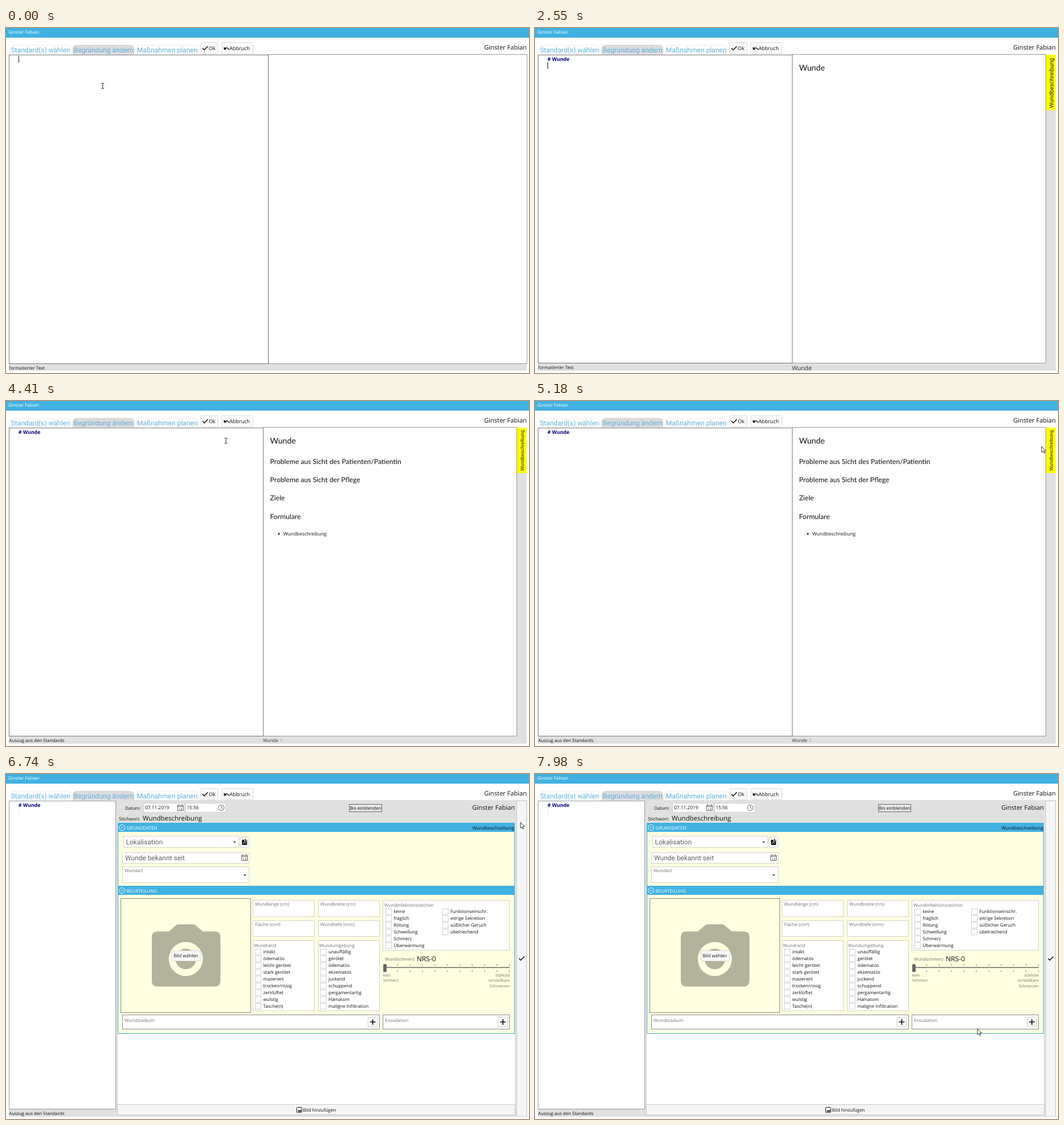
These frames come from a looping animation (922x608 px, 8000 ms). An HTML page:

```html
<!DOCTYPE html>
<html lang="de">
<head>
<meta charset="utf-8">
<title>Wundbeschreibung</title>
<style>
  html, body { margin: 0; width: 100%; height: 100%; overflow: hidden; background: #fff; }
  svg { display: block; width: 922px; height: 608px; }
  text { font-family: "Open Sans", "Noto Sans", sans-serif; white-space: pre; text-rendering: geometricPrecision; }
  .rob { font-family: Roboto, "Liberation Sans", sans-serif; }
  .lat { font-family: Lato, "Open Sans", sans-serif; }
  rect { shape-rendering: crispEdges; }
  .soft { shape-rendering: auto; }
</style>
</head>
<body>
<svg id="stage" viewBox="0 0 922 608"></svg>
<script>
const LOOP = 8000, STEP = 76.67;
const BLUE = '#41b1e1', GREY = '#e0e0e0', PALE = '#ffffe1', LABEL = '#707070';
const NAME = 'Ginster Fabian';

const attrs = o => Object.entries(o).map(([k, v]) => ` ${k}="${v}"`).join('');

function text(x, y, s, size = 8, fill = '#111', more = {}) {
  return `<text${attrs({ x, y, 'font-size': size, fill, ...more })}>${s}</text>`;
}

// Outer edges x0..x1, y0..y1; a stroke lies one pixel wide inside them.
function box(x0, y0, x1, y1, fill, stroke, more = {}) {
  const h = stroke ? 0.5 : 0, d = stroke ? 1 : 0;
  return `<rect${attrs({ x: x0 + h, y: y0 + h, width: x1 - x0 - d, height: y1 - y0 - d,
    fill, stroke: stroke || 'none', ...more })}/>`;
}

function path(d, stroke = '#111', width = 1, fill = 'none') {
  return `<path${attrs({ d, stroke, 'stroke-width': width, fill })}/>`;
}

const group = (id, ...parts) => `<g id="${id}">${parts.join('')}</g>`;
const round = r => ({ rx: r, class: 'soft' });
const END = { 'text-anchor': 'end' }, MID = { 'text-anchor': 'middle' };
const ROB = { class: 'rob' }, LAT = { class: 'lat' };

function topTab(x, w, label, active) {
  const d = `M${x} 46.5V37Q${x} 30.5 ${x + 7} 30.5H${x + w - 7}Q${x + w} 30.5 ${x + w} 37V46.5`;
  return path(d, active ? '#cfcfcf' : '#ececec', 1, active ? '#dcdcdc' : '#fff')
    + text(x + 1.2, 43, label, 12.1, '#5fb0de', ROB);
}

const calendar = (x, y) => box(x, y + 1, x + 11, y + 11, '#fff', '#666')
  + path(`M${x} ${y + 3.5}h11M${x + 2.5} ${y - 1}v3M${x + 8.5} ${y - 1}v3`, '#666')
  + text(x + 5.5, y + 9.6, '14', 6, '#444', MID);

const plus = (x, y) => box(x - 9, y - 9, x + 9, y + 9, '#fafafa', '#ccc', round(2))
  + path(`M${x - 5} ${y}h10M${x} ${y - 5}v10`, '#111', 1.7);

const check = (x, y) => path(`M${x - 4.5} ${y}l3 3.2l6.2 -6.4`, '#111', 1.6);

const arrowDown = (x, y) => path(`M${x - 2.2} ${y - 1}h4.4l-2.2 2.4z`, 'none', 0, '#111');

const field = (x0, y0, x1, y1, label) =>
  box(x0, y0, x1, y1, '#fff', '#d4d4c4') + text(x0 + 4, y0 + 9.5, label, 8, LABEL);

function checks(x, y, items) {
  return items.map((s, i) => {
    const cy = Math.round(y + i * 12.05);
    return box(x, cy - 5, x + 11, cy + 6, '#fff', '#d0d0d0') + text(x + 14.5, cy + 2.8, s);
  }).join('');
}

function section(y, title) {
  return box(197, y, 897, y + 16, BLUE)
    + `<circle cx="204.5" cy="${y + 8.5}" r="5" fill="none" stroke="#fff"/>`
    + path(`M202 ${y + 9.7}l2.5 -2.5l2.5 2.5`, '#fff')
    + text(212.5, y + 12, title, 8.1, '#fff');
}

const frame = [
  box(0, 0, 922, 17, BLUE),
  text(4, 10, NAME, 8.05, '#fff'),
  topTab(7.5, 107, 'Standard(s) wählen'),
  topTab(118, 107.5, 'Begründung ändern', true),
  topTab(229.5, 109, 'Maßnahmen planen'),
  box(343, 25, 374, 46, '#fafafa', '#dadada', round(2)), check(351, 35.5),
  text(357.5, 38.6, 'Ok', 9),
  box(380, 25, 436, 46, '#fafafa', '#dadada', round(2)),
  path('M384 33v5h5z', 'none', 0, '#111'), path('M385.5 36.3q4.5 -3.300 7.800 1.700', '#111', 1.4),
  text(394, 38.6, 'Abbruch', 9),
  text(918, 38, NAME, 11.1, '#111', END)
];

const empty = group('empty',
  box(5, 592, 918, 604, GREY),
  box(5, 47, 463, 592, '#fff', '#777'),
  box(462, 46, 919, 592, 'none', '#999'),
  box(462, 47, 463, 592, '#666'));

const preview = group('preview',
  box(5, 591, 918, 604, GREY),
  box(5, 47, 454, 591, '#fff', '#777'),
  box(453, 46, 901, 591, '#fff', '#999'),
  box(453, 47, 454, 591, '#777'),
  box(901, 47, 918, 604, GREY),
  text(465.5, 74.5, 'Wunde', 14.2, '#111', LAT),
  group('plan',
    ['Probleme aus Sicht des Patienten/Patientin', 'Probleme aus Sicht der Pflege', 'Ziele', 'Formulare']
      .map((s, i) => text(465.5, 110.5 + i * 32.4, s, 12.2, '#111', LAT)).join(''),
    '<circle cx="481" cy="234" r="1.5"/>',
    text(489, 237, 'Wundbeschreibung', 8.4)),
  text(483, 600.5, 'X', 8.4, '#6db6e0'),
  text(453, 600.5, 'Wunde', 8.1, '#333', { id: 'crumb' }),
  '<rect id="tabBox" x="901" y="47" width="17" height="80"/>',
  text(0, 0, 'Wundbeschreibung', 8.4, '#222', { id: 'tabText', class: 'rob' }),
  '<rect id="tabRing" x="901" y="47.5" width="16.5" height="79.5" rx="2" class="soft" fill="none" stroke="#111" stroke-width="1.8"/>');

const ticks = Array.from({ length: 11 }, (_, i) => `M${668.5 + i * 21.9} 335v3m0 8v3`).join('');

const form = group('form',
  box(5, 591, 194, 604, GREY),
  box(5, 47, 194, 591, '#fff', '#999'),
  box(194, 46, 919, 604, GREY),
  box(900, 47, 918, 604, '#f6f6f6', '#d0d0d0', { id: 'strip' }), check(909, 325),

  text(210, 63, 'Datum:', 7.9),
  box(242, 51, 315, 68, '#fff', '#d0d0d0'), text(245, 62.3, '07.11.2019', 8.4), calendar(302, 54),
  box(316, 51, 388, 68, '#fff', '#d0d0d0'), text(318.5, 62.3, '15:56', 8.4),
  '<circle cx="379.5" cy="59.5" r="5" fill="#fff" stroke="#555"/>', path('M379.5 56v3.5l2.5 1.5', '#555'),
  box(605, 53, 663, 67, '#e8e8e8', '#666'), text(606.5, 63.2, 'Bis einblenden'),
  text(897, 63, NAME, 11.1, '#111', END),
  text(199, 81.5, 'Stichwort:', 8.1), text(241, 82, 'Wundbeschreibung', 11.5),

  box(197, 86, 897, 458, PALE, BLUE),
  section(86, 'GRUNDDATEN'), text(896, 98, 'Wundbeschreibung', 8.1, '#111', END),
  section(197, 'BEURTEILUNG'),

  box(207, 109, 411, 130, '#fff', '#d4d4c4'), text(211.5, 124, 'Lokalisation', 12, '#606060', ROB),
  arrowDown(403, 120),
  box(412, 110, 429, 130, '#fafafa', '#d4d4d4', round(2)),
  box(416, 116, 425, 125, '#111', null, round(1)), path('M420.5 114.5h3v4h-3z', '#fff', 1, '#111'),
  path('M417.5 123l2.5 -3l2 2l1.5 -1', '#fff'),
  box(205, 138, 429, 158, '#fff', '#d4d4c4'), text(210, 152, 'Wunde bekannt seit', 12, '#606060', ROB),
  calendar(415, 142),
  field(205, 163, 429, 192, 'Wundart'), arrowDown(421, 178),

  box(202, 219, 432, 421, PALE, '#8a8a7a'),
  path('M267 277.5H287L300 266.500Q302 265 304 265H330Q332 265 334 266.500L347 277.5H368Q378 277.5 378 287.5V364.500Q378 374.500 368 374.500H267Q257 374.500 257 364.500V287.5Q257 277.5 267 277.5Z', 'none', 0, '#b2b29d'),
  `<circle cx="317" cy="326" r="24" fill="none" stroke="${PALE}" stroke-width="12"/>`,
  box(292, 311, 343, 330, '#fafafa', '#d4d4d4', round(2)), text(317, 323, 'Bild wählen', 8, '#111', MID),

  field(435, 222, 544, 252, 'Wundlänge (cm)'), field(550, 222, 659, 252, 'Wundbreite (cm)'),
  field(435, 258, 544, 287, 'Fläche (cm²)'), field(550, 258, 659, 287, 'Wundtiefe (mm)'),
  box(435, 293, 544, 418, '#fff', '#d4d4c4'), text(437, 304.5, 'Wundrand', 8, LABEL),
  checks(439, 313, ['intakt', 'ödematös', 'leicht gerötet', 'stark gerötet', 'mazeriert',
    'trocken/rissig', 'zerklüftet', 'wulstig', 'Tasche(n)']),
  box(550, 293, 659, 418, '#fff', '#d4d4c4'), text(552, 304.5, 'Wundumgebung', 8, LABEL),
  checks(554, 313, ['unauffällig', 'gerötet', 'ödematös', 'ekzematös', 'juckend', 'schuppend',
    'pergamentartig', 'Hämatom', 'maligne Infiltration']),
  box(664, 222, 888, 311, '#fff', '#d4d4c4'), text(667, 234, 'Wundinfektionszeichen', 8, LABEL),
  checks(669, 242, ['keine', 'fraglich', 'Rötung', 'Schwellung', 'Schmerz', 'Überwärmung']),
  checks(769, 242, ['Funktionseinschr.', 'eitrige Sekretion', 'süßlicher Geruch', 'übelriechend']),

  text(668, 328.5, 'Wundschmerz', 7.8, LABEL), text(724, 330, 'NRS-0', 12.1),
  box(668, 340, 888, 342, '#8c8c80'), path(ticks, '#777'),
  box(665, 335, 671, 349, '#666', null, round(2)),
  text(665, 356.5, 'kein', 6.8, LABEL), text(665, 366.3, 'Schmerz', 6.8, LABEL),
  ['stärkste', 'vorstellbare', 'Schmerzen'].map((s, i) => text(888, 356.5 + i * 9.7, s, 6.8, LABEL, END)).join(''),

  box(205, 424, 659, 450, '#fff', '#8a8a8a'), text(209, 437, 'Wundstadium', 8, LABEL), plus(646.5, 437),
  box(664, 424, 888, 450, '#fff', '#8a8a8a'), text(668, 437, 'Exsudation', 8, LABEL), plus(876, 437),

  box(197, 458, 897, 583, '#fff'),
  box(197, 457, 897, 458, BLUE),
  box(196, 582, 898, 601, '#f5f5f5', '#c8c8c8'),
  box(512, 587, 522, 597, '#fff', '#111', round(1)), path('M514 595l2 -3l1.5 1.5l1.5 -2l2 3.5z', 'none', 0, '#111'),
  text(523.5, 595, 'Bild hinzufügen'));

const overlay = [
  text(5.5, 601.5, '', 7.95, '#111', { id: 'status' }),
  text(22, 58, '', 8.8, '#000080', { id: 'typed' }),
  box(22, 61, 23, 72, '#e8e8e8', null, { id: 'guide' }),
  box(0, 0, 1, 12, '#111', null, { id: 'caret' }),
  group('ibeam', path('M-2.5 -4.5h2l.5 .5l.5 -.5h2M-2.5 4.5h2l.5 -.5l.5 .5h2M0 -4v8', '#222')),
  group('arrow', path('M0 0V10.5L2.5 8.3L4.3 12L5.9 11.3L4.2 7.7H7.4Z', '#222', 0.9, '#fff'))
];

const stage = document.getElementById('stage');
stage.innerHTML = [...frame, empty, preview, form, ...overlay].join('');
const el = {};
stage.querySelectorAll('[id]').forEach(n => el[n.id] = n);

const show = (n, on) => n.style.display = on ? '' : 'none';
const set = (n, o) => { for (const k in o) n.setAttribute(k, o[k]); };

// Values between [time, a, b, ...] points, held at both ends.
function track(points, t) {
  const last = points[points.length - 1];
  if (t <= points[0][0]) return points[0].slice(1);
  for (let i = 1; i < points.length; i++) {
    const p = points[i - 1], q = points[i];
    if (t < q[0]) {
      const k = (t - p[0]) / (q[0] - p[0]);
      return p.slice(1).map((v, j) => v + (q[j + 1] - v) * k);
    }
  }
  return last.slice(1);
}

const stepped = (t, from) => from + Math.floor((t + 10 - from) / STEP) * STEP;

const KEYS = [160, 540, 860, 1010, 1240, 1550, 1930];
const TAB = [[2550, 98, 10.3], [3170, 88, 9.35], [3330, 80, 8.4]];
const CRUMB = [[2550, 10.5, 602.5], [3170, 8.85, 601], [3560, 8.1, 600.5]];
const TO_TAB = [[4110, 200, 99], [4417, 388, 70], [4640, 620, 62], [4877, 833, 68], [5180, 893, 80], [5480, 907, 85]];
const TO_FORM = [[7593, 907, 85], [7670, 872, 165], [7747, 810, 310], [7823, 762, 415], [7900, 768, 441], [7977, 780, 449]];

function mouse(t) {
  if (t < 80) return [170.5, 102];
  if (t < 4110) return null;
  if (t < 7670) return track(TO_TAB, stepped(t, 4110));
  return track(TO_FORM, stepped(t, 7670));
}

function caretOn(t) {
  if (t < 3030) return true;
  if (t < 3560 || t >= 5890) return false;
  return Math.floor((t - 3560) / 540) % 2 === 0;
}

function render(t) {
  const isForm = t >= 6740, split = t >= 2470;
  show(el.empty, !split);
  show(el.preview, split && !isForm);
  show(el.form, isForm);
  show(el.plan, t >= 2700);
  el.status.textContent = t < 2700 ? 'formatierter Text' : 'Auszug aus den Standards';
  set(el.status, { y: split ? 600.5 : 601.5 });

  const n = KEYS.filter(k => t >= k).length, line2 = t >= 2390;
  el.typed.textContent = '# Wunde'.slice(0, n);
  set(el.typed, { fill: n < 2 ? '#111' : '#000080', 'font-weight': n < 2 ? 400 : 700 });
  const x = line2 || !n ? 22 : 22 + el.typed.getComputedTextLength();
  set(el.caret, { x: Math.round(x - 0.4), y: line2 ? 60 : 49 });
  show(el.caret, caretOn(t));
  show(el.guide, line2);

  const [h, size] = track(TAB, stepped(t, 2550));
  set(el.tabBox, { height: h, fill: t >= 5490 ? GREY : '#ffff00' });
  set(el.tabText, { 'font-size': size, transform: `translate(${912.9 + (size - 8.4) * 0.8} ${47 + h - 4}) rotate(-90)` });
  show(el.tabRing, t >= 5890);
  const [cs, cy] = track(CRUMB, stepped(t, 2550));
  set(el.crumb, { 'font-size': cs, y: cy });
  set(el.strip, { fill: t >= 6820 && t < 7670 ? '#ececec' : '#f6f6f6' });

  const m = mouse(t), beam = m && m[0] < 453;
  show(el.ibeam, beam);
  show(el.arrow, m && !beam);
  if (m) set(beam ? el.ibeam : el.arrow, { transform: `translate(${m[0]} ${m[1]})` });
}

const start = performance.now();
function tick() {
  render((performance.now() - start) % LOOP);
  requestAnimationFrame(tick);
}
render(0);
requestAnimationFrame(tick);
</script>
</body>
</html>
```
